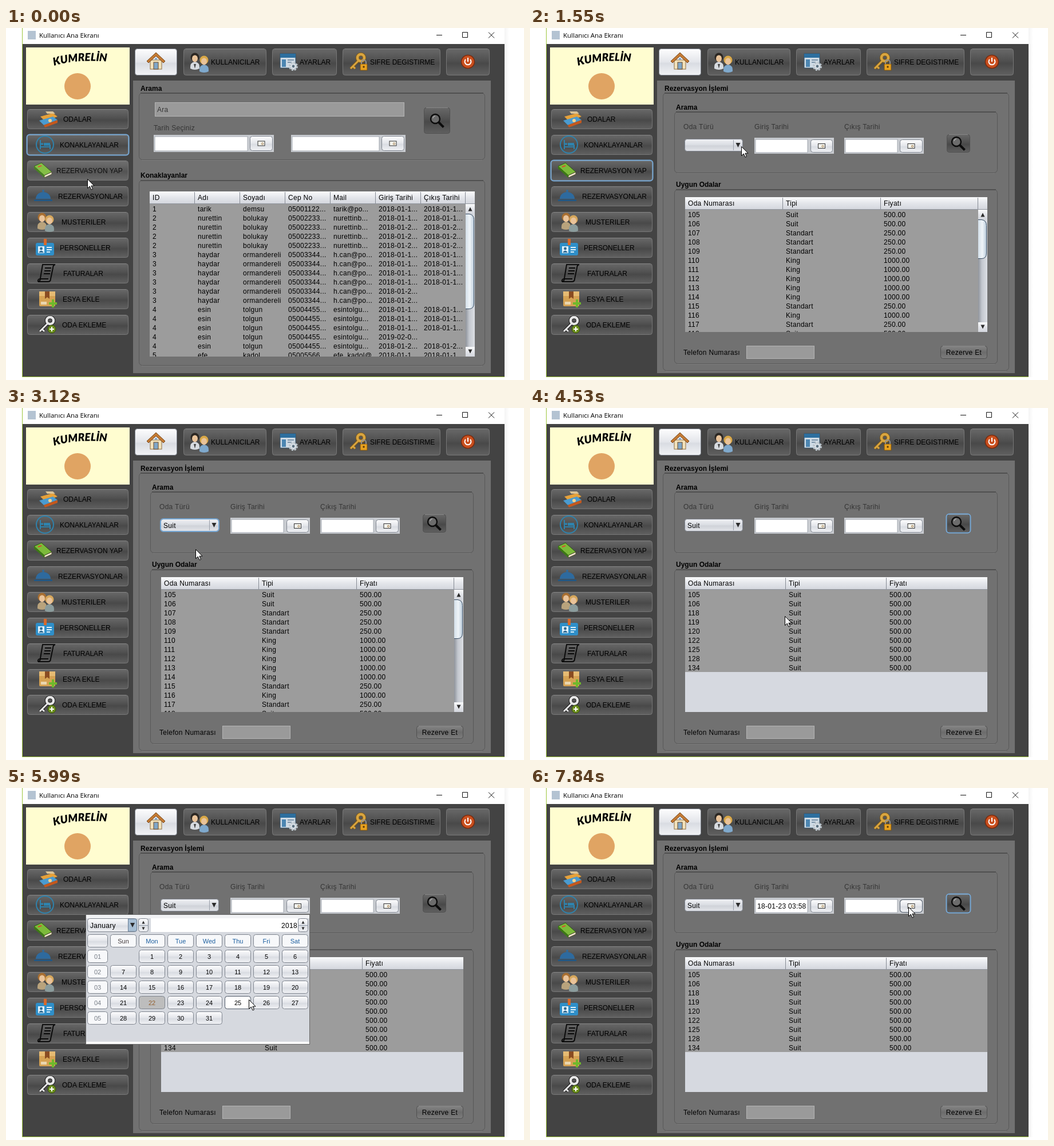
These frames come from a looping animation (905x616 px, 7990 ms). An HTML page:

```html
<!DOCTYPE html>
<html lang="tr">
<head>
<meta charset="utf-8">
<title>Kullanıcı Ana Ekranı</title>
<style>
html, body { margin: 0; width: 100%; height: 100%; overflow: hidden; background: #fff; }
svg { display: block; }
text { font: 12px "Liberation Sans", Arial, sans-serif; white-space: pre; }
.b { font-weight: bold; }
.s { letter-spacing: .3px; }
.d { font-size: 11px; text-anchor: middle; }
.dim { fill: #353535; }
</style>
</head>
<body>
<svg id="stage" width="905" height="616" viewBox="0 0 905 616"></svg>
<script>
const LOOP = 7990;

// Markup helpers
const rect = (x, y, w, h, fill, more = '') =>
  `<rect x="${x}" y="${y}" width="${w}" height="${h}" fill="${fill}" ${more}/>`;
const path = (d, fill, more = '') => `<path d="${d}" fill="${fill}" ${more}/>`;
const line = (d, color, w = 1) => path(d, 'none', `stroke="${color}" stroke-width="${w}"`);
const circle = (x, y, r, fill, more = '') => `<circle cx="${x}" cy="${y}" r="${r}" fill="${fill}" ${more}/>`;
const text = (x, y, s, cls = '', more = '') => `<text x="${x}" y="${y}" class="${cls}" ${more}>${s}</text>`;
const group = (id, body, more = '') => `<g id="${id}" ${more}>${body}</g>`;
const at = (x, y, body) => `<g transform="translate(${x} ${y})">${body}</g>`;
const grad = (id, stops, flat) =>
  `<linearGradient id="${id}" x2="${flat ? 1 : 0}" y2="${flat ? 0 : 1}">` +
  stops.map(([o, c]) => `<stop offset="${o}" stop-color="${c}"/>`).join('') + '</linearGradient>';
const clip = (id, x, y, w, h) => `<clipPath id="${id}">${rect(x, y, w, h, '#000')}</clipPath>`;

// Widgets
const darkBtn = (x, y, w, h, fill = 'url(#dark)', edge = '#777') =>
  rect(x + .5, y + .5, w - 1, h - 1, fill, `rx="4" stroke="${edge}"`) +
  line(`M${x + 4} ${y + .5}H${x + w - 4}`, '#868686');
const lightBtn = (x, y, w, h, fill = 'url(#light)') =>
  rect(x + .5, y + .5, w - 1, h - 1, fill, 'rx="4" stroke="#7f858f"');
const ring = (id, x, y, w, h, color = '#76a7d4', width = 2) =>
  rect(x, y, w, h, 'none', `id="${id}" rx="5" stroke="${color}" stroke-width="${width}"`);
const glow = (id, x, y, w, h, color = '#fff', o = .1) =>
  rect(x, y, w, h, color, `id="${id}" rx="4" opacity="${o}"`);
const panel = (x, y, x2, y2) =>
  rect(x + .5, y + .5, x2 - x - 1, y2 - y - 1, 'none', 'rx="6" stroke="#585858"') +
  line(`M${x + 3} ${y + 1}H${x2 - 3}`, '#505050', 2) +
  line(`M${x + 5} ${y2 + .5}H${x2 - 5}`, '#7e7e7e');
const tri = (x, y, up, s = 4) =>
  path(`M${x - s} ${y + (up ? s : -s)}h${2 * s}L${x} ${y + (up ? -s : s)}Z`, '#2b2b2b');
const greyField = (x, y, w, h) => rect(x + .5, y + .5, w - 1, h - 1, '#9a9a9a', 'stroke="#b4b4b4"');
const lens = (x, y) =>
  circle(x - 3, y - 3, 8, '#6c6c6c', 'stroke="#0c0c0c" stroke-width="2.4"') +
  path(`M${x - 7} ${y - 4}a4.5 4.5 0 0 1 4-4`, 'none', 'stroke="#aaa" stroke-width="1.4"') +
  line(`M${x + 3} ${y + 3}l8.500 8.500`, '#0c0c0c', 4);

function datePicker(x, y, w, h, fieldW, btnX, btnW) {
  const by = y + (h > 29 ? 2 : 3), bh = h > 29 ? 26 : 23, cx = btnX + btnW / 2, cy = by + bh / 2;
  return rect(x, y, w, h, '#c9ccd1') + rect(x + 2, y + 3, fieldW, h - 5, '#fff', 'stroke="#a4a9b1"') +
    lightBtn(btnX, by, btnW, bh) +
    rect(cx - 6, cy - 4, 12, 8, '#f4f4ee', 'stroke="#333"') +
    circle(cx + 2, cy + .5, 1.6, 'none', 'stroke="#a07a4a"');
}

function header(x, y, w, lines, labels) {
  return rect(x, y, w, 22, 'url(#head)') + line(`M${x} ${y + 21.5}h${w}`, '#8e939c') +
    lines.map(l => line(`M${l + .5} ${y + 1}v20`, '#858a93')).join('') +
    labels.map(([lx, s]) => text(lx, y + 15, s, 's')).join('');
}

function scrollbar(x, y, y2, thumbEnd) {
  return rect(x, y, 16, y2 - y, 'url(#track)') +
    rect(x, y, 16, 17, 'url(#head)') + rect(x, y2 - 17, 16, 17, 'url(#head)') +
    rect(x, y + 18, 8, thumbEnd - y - 18, 'url(#thumb)') +
    path(`M${x} ${y + 17.5}h6q8.500 1 8.500 10V${thumbEnd - 10}q0 9.500-8.500 9.500h-6Z`, 'url(#thumb)') +
    line(`M${x} ${y + 17.5}h6q8.500 1 8.500 10V${thumbEnd - 10}q0 9.500-8.500 9.500h-6`, '#364a60') +
    tri(x + 8, y + 9, true, 3.5) + tri(x + 8, y2 - 9, false, 3.5);
}

const rows = (list, xs, y) => list.map((cells, i) =>
  cells.map((s, j) => text(xs[j], y + 16 * i, s, 's')).join('')).join('');

// Small icons, each drawn around its own centre
const person = (x, y, hair, coat) =>
  path(`M${x - 8} ${y + 14}q-1-11 8-12q9 1 8 12q-8 4-16 0Z`, coat) +
  circle(x, y - 6, 7.5, hair) + `<ellipse cx="${x}" cy="${y - 3.5}" rx="5" ry="6" fill="#e9c39a"/>`;
const key = (color, edge) => [[edge, 2], [color, 0]].map(([c, grow]) =>
  line('M2-3L-13 12M-9 8l4 4', c, 3 + grow) + circle(5, -7, 6, 'none', `stroke="${c}" stroke-width="${4.5 + grow}"`)).join('');
const icons = {
  home: rect(-10, -3, 20, 16, '#f3e3bd', 'stroke="#8d6f42"') + path('M-16-1L0-16 16-1l-3 3L0-10-13 2Z', '#c47b34', 'stroke="#74441a"') +
    rect(-4, 1, 8, 12, '#7fa6c8', 'stroke="#6d4a25"') + circle(0, -5, 2, '#7fa6c8'),
  users: person(-8, -2, '#2b2622', '#d7dbe0') + path('M-10 4h4l-2 8Z', '#444') + person(8, 3, '#d9a847', '#7fa9cd'),
  settings: rect(-14, -14, 27, 25, '#cfdbe5', 'stroke="#2a4c66"') + rect(-14, -14, 27, 7, '#2d6f9f') +
    rect(-11, -4, 7, 13, '#4c86b2') + line('M-1-3H10M-1 1H6', '#7b93a8', 2) +
    circle(9, 8, 6, '#dfe6ec', 'stroke="#bcc5cc" stroke-width="4" stroke-dasharray="3 1.6"') + circle(9, 8, 2.4, '#5c7181'),
  secret: key('#d9a53f', '#7d5a1c') + rect(4, 4, 12, 11, '#e8a21f', 'stroke="#7d5310"') +
    path('M6 4v-3a4 4 0 0 1 8 0v3', 'none', 'stroke="#909090" stroke-width="2"') + circle(10, 9, 1.7, '#5b3a08'),
  power: circle(0, 0, 11.5, '#c9501f', 'stroke="#7a2a0d" stroke-width="1.5"') +
    path('M-4-4a5.500 5.500 0 1 0 8 0', 'none', 'stroke="#fff" stroke-width="2"') + line('M0-7V0', '#fff', 2),
  rooms: path('M-14-4L8-10 16-4-6 4Z', '#e6a13a') + path('M-16 3L8-4l8 6L-8 11Z', '#4a9bd0') + path('M-8 11L16 2v5L-6 15Z', '#c4581d') +
    path('M-5-13h13l4 4H-2Z', '#d9c294') + circle(3, 3, 3, '#f2d28c'),
  bed: circle(0, 0, 15, 'none', 'stroke="#2f83ad" stroke-width="2"') + line('M-8-8V8M-8 4H9M9 8V0', '#2f83ad', 2) +
    rect(-2, -3, 11, 5, '#2f83ad') + circle(-5, -1, 2, '#2f83ad'),
  book: path('M-15-7L-2-13 16 3 3 9Z', '#7cba3a', 'stroke="#2d5a10"') + path('M3 9L16 3v4L3 13Z', '#efe6cc', 'stroke="#4d4a30"') +
    path('M-15-7L3 9v4L-15-3Z', '#3d7a16') + line('M-8-6L-2-8', '#d94f2a', 2),
  cloche: path('M-13 5a13 12 0 0 1 26 0Z', '#2e6a9e') + rect(-16, 6, 32, 3, '#245782') + circle(0, -9, 2, '#2e6a9e'),
  guests: person(-6, -2, '#a96f31', '#b9a37c') + person(7, 2, '#d6a75c', '#8b9c9c'),
  card: rect(-16, -8, 32, 22, '#2f8fc9', 'rx="3"') + rect(-2, -15, 5, 11, '#d6692c') + rect(-12, -2, 11, 12, '#dff0fa') +
    circle(-6.5, 2, 2.4, '#2f6a91') + path('M-11 9q4.500-7 9 0Z', '#2f6a91') + line('M3 0H12M3 4H12M3 8H9', '#dff0fa', 2),
  bill: path('M-7-15H15q-4 1-4 6L7 10q0 5-5 5h-17q4-1 4-6Z', 'none', 'stroke="#0b0b0b" stroke-width="2"') +
    path('M-15 15q-1-5 4-5H3', 'none', 'stroke="#0b0b0b" stroke-width="2"') + line('M-3-9H8M-4-4H7M-5 1H6', '#0b0b0b', 2),
  crate: rect(-14, -13, 28, 26, '#d5a253', 'rx="2"') + rect(-14, -13, 28, 8, '#e6bb73') + path('M-4-13h8V0L0-3l-4 3Z', '#8a4c22') +
    rect(-11, 5, 10, 5, '#ead6ae') + line('M10 1V15M3 8H17', '#6fb92c', 4),
  addRoom: key('#e6e6e6', '#1c1c1c') + circle(8, 8, 7, '#6d8f1d', 'stroke="#35520a"') + line('M8 4v8M4 8h8', '#fff', 2)
};

const menu = [['ODALAR', 100, 74, 'rooms'], ['KONAKLAYANLAR', 94, 68, 'bed'], ['REZERVASYON YAP', 88, 64, 'book'],
  ['REZERVASYONLAR', 91, 65, 'cloche'], ['MUSTERILER', 97, 69, 'guests'], ['PERSONELLER', 94, 68, 'card'],
  ['FATURALAR', 100, 71, 'bill'], ['ESYA EKLE', 99, 72, 'crate'], ['ODA EKLEME', 98, 72, 'addRoom']];
const tools = [[310, 145, 338, 'users', 'KULLANICILAR', 358], [465, 113, 493, 'settings', 'AYARLAR', 513],
  [588, 171, 615, 'secret', 'SIFRE DEGISTIRME', 636], [769, 76, 807, 'power', '', 0]];

function frame() {
  const side = menu.map(([label, x, ix, icon], i) => {
    const y = 142 + 45 * i;
    return darkBtn(37, y, 177, 35) + at(ix, y + 17, icons[icon]) + text(x, y + 22, label);
  }).join('');
  const top = tools.map(([x, w, ix, icon, label, tx]) =>
    darkBtn(x, 36, w, 47) + at(ix, 59, icons[icon]) + text(tx, 64, label)).join('');
  return rect(871, 0, 8, 611, 'url(#shade)') +
    rect(28, 0, 843, 611, '#9dc63c') + rect(29, 0, 842, 28, '#fff') + rect(29, 28, 842, 582, '#434343') +
    rect(38, 5, 14, 15, '#b4c3d2') +
    text(58, 17, 'Kullanıcı Ana Ekranı', '', 'style="font:11.5px \'Open Sans\',sans-serif"') +
    line('M752 12.5h10M797.500 7.500h9v9h-9ZM843 7.500l10 10M853 7.500l-10 10', '#111') +
    rect(35, 34, 181, 100, '#fffdd0') + circle(125, 102, 23, '#e0a463') +
    '<path id="arc" d="M84 66Q126 53 190 60" fill="none"/>' +
    '<text style="font:italic 900 19px Lato,sans-serif"><textPath href="#arc">KUMRELİN</textPath></text>' +
    side + lightBtn(225, 36, 74, 47) + at(262, 59, icons.home) + top + rect(222, 92, 625, 512, '#717171') +
    glow('menuHover', 38, 233, 175, 33, '#fff', .06) + glow('menuPress', 38, 233, 175, 33, '#000', .25) +
    ring('focus1', 36.5, 186.5, 178, 36) + ring('focus2', 36.5, 231.5, 178, 36);
}

function guestPage() {
  const people = [
    ['tarik', 'demsu', '05001122...', 'tarik@po...'], ['nurettin', 'bolukay', '05002233...', 'nurettinb...'],
    ['haydar', 'ormandereli', '05003344...', 'h.can@po...'], ['esin', 'tolgun', '05004455...', 'esintolgu...'],
    ['efe', 'kadol', '05005566...', 'efe_kadol@...']];
  const stay = { a: ['2018-01-1...', '2018-01-1...'], b: ['2018-01-2...', '2018-01-2...'], c: ['2018-01-2...', ''], d: ['2019-02-0...', ''] };
  const list = [...'12222333333444445'].map((id, i) => [id, ...people[id - 1], ...stay['aabbbaaaaccaaadba'[i]]]);
  const xs = [0, 1, 2, 3, 4, 5, 6].map(i => 256 + 79 * i);
  const names = ['ID', 'Adı', 'Soyadı', 'Cep No', 'Mail', 'Giriş Tarihi', 'Çıkış Tarihi'];
  return text(235, 110, 'Arama', 'b') + panel(232, 113, 837, 231) + greyField(260, 130, 436, 25) + text(264, 147, 'Ara', 's dim') +
    text(258, 179, 'Tarih Seçiniz', 's dim') +
    datePicker(258, 187, 210, 30, 162, 426, 40) + datePicker(498, 187, 200, 30, 152, 656, 40) +
    darkBtn(730, 139, 46, 46, 'url(#dark)', '#505050') + lens(753, 162) +
    text(235, 262, 'Konaklayanlar', 'b') + panel(232, 266, 837, 591) + rect(251, 308, 552, 267, '#9c9c9c') +
    header(251, 286, 568, xs.slice(1).map(x => x - 6).concat(802), names.map((n, i) => [xs[i], n])) +
    `<g clip-path="url(#clipA)">${rows(list, xs, 321)}</g>` + scrollbar(803, 308, 575, 492);
}

function bookingPage() {
  const kind = { S: ['Suit', '500.00'], T: ['Standart', '250.00'], K: ['King', '1000.00'] };
  const all = [...'SSTTTKKKKKTKTS'].map((k, i) => [105 + i, ...kind[k]]);
  const suites = [105, 106, 118, 119, 120, 122, 125, 128, 134].map(n => [n, ...kind.S]);
  const cols = (a, b) => [[276, 'Oda Numarası'], [a, 'Tipi'], [b, 'Fiyatı']];
  return text(235, 110, 'Rezervasyon İşlemi', 'b') + panel(232, 113, 837, 600) +
    text(255, 143, 'Arama', 'b') + panel(252, 146, 817, 254) +
    text(268, 177, 'Oda Türü', 's dim') + text(392, 177, 'Giriş Tarihi', 's dim') + text(549, 177, 'Çıkış Tarihi', 's dim') +
    lightBtn(270, 194, 102, 22, 'url(#combo)') + line('M355.500 196v18', '#9aa0aa') + tri(363.5, 205, false) +
    text(275, 210, 'Suit', 's', 'id="comboText"') + ring('comboFocus', 270, 194, 102, 22) +
    datePicker(392, 192, 139, 28, 91, 490, 39) + datePicker(549, 192, 139, 28, 91, 646, 40) +
    ring('dateHover1', 490.5, 195.5, 38, 22, '#4d5866', 1) + ring('dateHover2', 646.5, 195.5, 39, 22, '#4d5866', 1) +
    text(397, 211, '18-01-23 03:58', 's', 'id="dateText"') +
    darkBtn(728, 186, 41, 32, 'url(#dark)', '#505050') + glow('searchHover', 729, 187, 39, 30) +
    glow('searchPress', 729, 187, 39, 30, '#000', .3) + lens(748, 202) + ring('searchFocus', 727.5, 185.5, 42, 33) +
    text(255, 278, 'Uygun Odalar', 'b') + panel(252, 282, 817, 588) +
    group('tableAll', rect(271, 318, 512, 214, '#9c9c9c') + header(271, 296, 528, [441, 612, 782], cols(447, 618)) +
      `<g clip-path="url(#clipB)">${rows(all, [276, 447, 618], 331)}</g>` + scrollbar(783, 318, 532, 404)) +
    group('tableSuit', rect(271, 318, 528, 214, '#d6d9e0') + rect(271, 318, 528, 144, '#9c9c9c') +
      header(271, 296, 528, [446, 622], cols(452, 628)) + rows(suites, [276, 452, 628], 331)) +
    text(268, 572, 'Telefon Numarası', 's') + greyField(378, 556, 119, 23) +
    darkBtn(717, 556, 82, 23, 'url(#soft)', '#505050') + text(758, 572, 'Rezerve Et', 's', 'text-anchor="middle"');
}

const types = ['', 'Suit', 'Standart', 'King', 'Aile', 'Ekonomik'];
const dropdown = () => rect(270.5, 216.5, 101, 123, '#fff', 'stroke="#6b727d"') +
  rect(271, 218, 100, 20, '#39698a', 'id="typeHover"') + types.map((s, i) => text(276, 232 + 20 * i, s, 's')).join('');

const spinner = (x, y) => lightBtn(x, y, 18, 24) + line(`M${x} ${y + 12.5}h18`, '#8d97a5') +
  tri(x + 9, y + 7, true, 2.5) + tri(x + 9, y + 18, false, 2.5);

function calendar() {
  let cells = lightBtn(142, 256, 36, 23), labels = '';
  ['Sun', 'Mon', 'Tue', 'Wed', 'Thu', 'Fri', 'Sat'].forEach((name, c) => {
    cells += lightBtn(182 + 50 * c, 256, 46, 23, '#f7f8fa');
    labels += text(205 + 50 * c, 272, name, 'd', `fill="${c ? '#1d5f9f' : '#443c3c'}"`);
  });
  for (let r = 0; r < 5; r++) {
    const y = 283 + 27 * r;
    cells += lightBtn(142, y, 36, 23, '#f7f8fa');
    labels += text(160, y + 16, '0' + (r + 1), 'd', 'fill="#777d86"');
    for (let c = 0; c < 7; c++) {
      const day = 7 * r + c, x = 182 + 50 * c;
      if (day < 1 || day > 31) continue;
      cells += lightBtn(x, y, 46, 23, day === 22 ? '#bdbdbd' : 'url(#light)');
      labels += text(x + 23, y + 16, day, 'd', day === 22 ? 'fill="#93602f"' : '');
    }
  }
  return rect(139.5, 221.5, 391, 227, '#d6d9df', 'stroke="#686868"') + rect(140, 222, 390, 6, '#f1f2f4') + rect(140, 444, 390, 4, '#fafafa') +
    lightBtn(142, 228, 87, 24) + path('M213.500 229h12q3 0 3 4v14q0 4-3 4h-12Z', '#a7bed3', 'stroke="#6a7f95"') + tri(221, 240, false) +
    text(147, 245, 'January', 's') + spinner(231, 228) + rect(253, 228, 257, 24, '#fff') +
    text(509, 245, '2018', 's', 'text-anchor="end"') + spinner(510, 228) +
    cells + rect(0, 0, 45, 22, '#fff', 'id="dayHover" rx="4" stroke="#505a68"') + labels;
}

const stage = document.getElementById('stage');
stage.innerHTML = '<defs>' +
  grad('dark', [[0, '#686868'], [.45, '#505050'], [.55, '#494949'], [1, '#606060']]) +
  grad('soft', [[0, '#858585'], [.5, '#6c6c6c'], [1, '#7c7c7c']]) +
  grad('light', [[0, '#fdfdfe'], [.5, '#e3e5ea'], [.55, '#d9dce2'], [1, '#f1f2f5']]) +
  grad('combo', [[0, '#f0f1f4'], [.5, '#d9dce2'], [.55, '#cfd2d8'], [1, '#e2e4e9']]) +
  grad('head', [[0, '#fafbfc'], [.5, '#e3e5ea'], [1, '#d3d6dd']]) +
  grad('track', [[0, '#8f949c'], [.4, '#c3c7ce'], [1, '#dcdfe4']], true) +
  grad('thumb', [[0, '#d3dfe9'], [.5, '#eff4f8'], [1, '#bccddc']], true) +
  grad('shade', [[0, '#f4f4f4'], [1, '#fff']], true) +
  clip('clipA', 251, 308, 552, 267) + clip('clipB', 271, 318, 512, 214) + '</defs>' +
  rect(0, 0, 905, 616, '#fff') + frame() + group('guests', guestPage()) + group('booking', bookingPage()) +
  group('types', dropdown()) + group('calendar', calendar()) +
  group('cursor', path('M.5.5V16.500L4.300 13 7 19 9.500 18 6.900 12.200H12Z', '#fff', 'stroke="#000"'));

const el = {};
stage.querySelectorAll('[id]').forEach(n => { el[n.id] = n; });
const show = (id, on) => { el[id].style.display = on ? '' : 'none'; };
const typeLabels = [...el.types.querySelectorAll('text')];

// Pointer moves: start, end, steps, target x, y, optional bend point
const moves = [
  [1230, 1550, 5, 369, 207],
  [2110, 2640, 8, 331, 247, 344, 284],
  [3198, 3750, 8, 749, 203],
  [4380, 4530, 3, 445, 364],
  [4610, 4610, 1, 431, 360],
  [4690, 5070, 6, 504, 209],
  [5210, 5290, 2, 495, 210],
  [5680, 5990, 5, 424, 370],
  [6060, 6290, 4, 368, 381],
  [6520, 6830, 5, 308, 382],
  [7220, 7840, 9, 661, 208]
];

function pointer(t) {
  let x = 142, y = 264;
  for (const [a, b, n, tx, ty, bx = (x + tx) / 2, by = (y + ty) / 2] of moves) {
    if (t < a) break;
    const k = n > 1 ? Math.min(n - 1, Math.floor((t - a) / (b - a) * (n - 1) + .1)) : 0;
    const p = (k + 1) / n, e = p * p * (3 - 2 * p), q = 1 - e;
    x = q * q * x + 2 * q * e * bx + e * e * tx;
    y = q * q * y + 2 * q * e * by + e * e * ty;
  }
  return [Math.round(x), Math.round(y)];
}

function render(t) {
  const within = (a, b) => t >= a && t < b;
  const [x, y] = pointer(t);
  const over = (l, top, r, bottom) => x >= l && x < r && y >= top && y < bottom;

  show('guests', t < 930);
  show('booking', t >= 930);
  show('focus1', t < 670);
  show('focus2', within(670, 1930));
  show('menuHover', over(37, 232, 214, 267));
  show('menuPress', within(670, 770));

  show('types', within(1930, 3120));
  const row = Math.max(0, Math.min(5, Math.floor((y - 218) / 20)));
  el.typeHover.setAttribute('y', 218 + 20 * row);
  typeLabels.forEach((n, i) => n.setAttribute('fill', i === row ? '#fff' : '#000'));
  show('comboText', t >= 3120);
  show('comboFocus', within(1930, 3970));

  show('searchHover', over(728, 186, 769, 218));
  show('searchPress', within(3970, 4050));
  show('searchFocus', within(3970, 5600) || t >= 7070);
  show('tableAll', t < 4120);
  show('tableSuit', t >= 4120);

  show('dateHover1', over(490, 195, 529, 218));
  show('dateHover2', over(646, 195, 686, 218));
  show('dateText', t >= 7070);

  show('calendar', within(5600, 7070));
  const c = Math.floor((x - 182) / 50), r = Math.floor((y - 283) / 27), day = 7 * r + c;
  show('dayHover', over(182, 283, 528, 414) && (x - 182) % 50 < 46 && (y - 283) % 27 < 23 && day > 0 && day < 32 && day !== 22);
  el.dayHover.setAttribute('x', 182.5 + 50 * c);
  el.dayHover.setAttribute('y', 283.5 + 27 * r);
  el.dayHover.setAttribute('fill', t >= 6980 ? '#b4bfcc' : '#fff');

  el.cursor.setAttribute('transform', `translate(${x} ${y})`);
}

const start = performance.now();
function tick() {
  render((performance.now() - start) % LOOP);
  requestAnimationFrame(tick);
}
tick();
</script>
</body>
</html>
```
